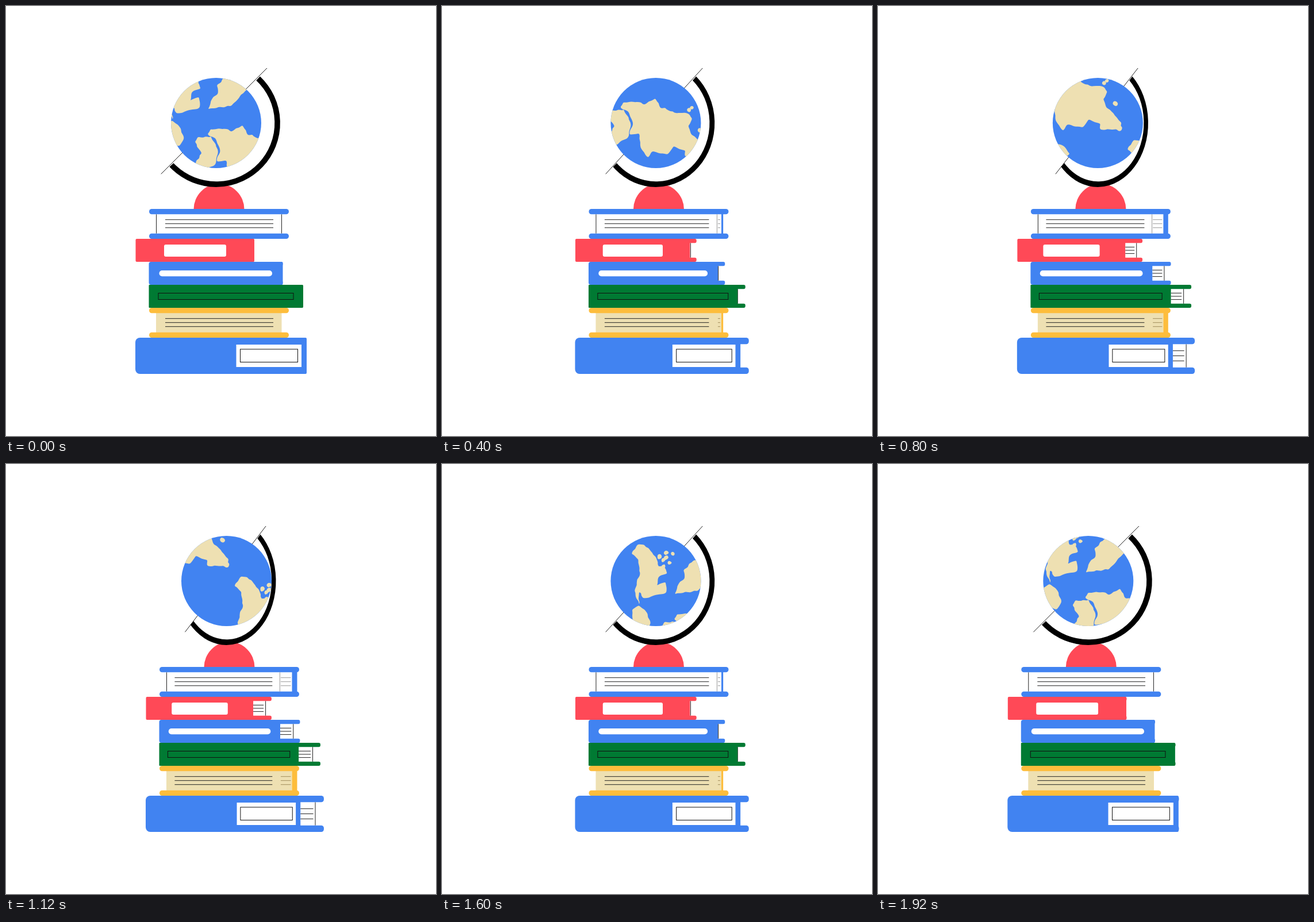
These frames come from a looping animation (748x748 px, 2000 ms). An HTML page with a canvas:

```html
<!DOCTYPE html>
<html lang="en">
<head>
<meta charset="utf-8">
<title>Globe on books</title>
<style>
html, body { margin: 0; width: 100%; height: 100%; overflow: hidden; background: #fff; }
canvas { display: block; width: 748px; height: 748px; }
</style>
</head>
<body>
<canvas id="stage" width="748" height="748"></canvas>
<script>
const ctx = document.getElementById('stage').getContext('2d');
const BLUE = '#4183f1', RED = '#ff4957', GREEN = '#007a33', YELLOW = '#fdbd3c';
const BEIGE = '#eee0b2', INK = '#222', SOFT = '#999';
const LOOP = 2000, STEP = 80, STEPS = LOOP / STEP;
const SHIFT = 18.65;     // sideways travel of every part at full turn
const SQUASH = 0.1;      // share of its width a book front loses at full turn
const DEPTH = 31;        // how far the far cover slides out at full turn
const DRIFT = 9.36;      // map travel per step, left and up
const GLOBE = { x: 365.5, y: 203.5, r: 78.5 };

let seed = 7;
function random() {
  seed = (seed * 16807) % 2147483647;
  return seed / 2147483647;
}

const mid = (a, b) => [(a[0] + b[0]) / 2, (a[1] + b[1]) / 2];

function smooth(pts) {
  const path = new Path2D();
  path.moveTo(...mid(pts[pts.length - 1], pts[0]));
  pts.forEach((pt, i) => path.quadraticCurveTo(...pt, ...mid(pt, pts[(i + 1) % pts.length])));
  path.closePath();
  return path;
}

// Turns a few corners into a ragged shore.
function coast(text) {
  const corners = text.split(' ').map(pair => pair.split(',').map(Number));
  const pts = corners.flatMap(([x, y], i) => {
    const [x2, y2] = corners[(i + 1) % corners.length];
    const parts = Math.max(2, Math.round(Math.hypot(x2 - x, y2 - y) / 5));
    return Array.from({ length: parts }, (_, k) => {
      const rough = k ? 3.5 : 0, t = k / parts;
      return [x + (x2 - x) * t + (random() - .5) * rough, y + (y2 - y) * t + (random() - .5) * rough];
    });
  });
  return smooth(pts);
}

// A loose spiral of islets.
function islands(x, y, count) {
  return Array.from({ length: count }, (_, i) => {
    const cx = x + 6 * Math.sqrt(i) * Math.cos(i * 2.4);
    const cy = y + 6 * Math.sqrt(i) * Math.sin(i * 2.4);
    return smooth(Array.from({ length: 6 }, (_, k) => {
      const r = 2.5 + 3 * random(), a = k * Math.PI / 3;
      return [cx + r * Math.cos(a), cy + r * Math.sin(a)];
    }));
  });
}

// Flat map, measured from the middle of the globe at the start of the loop.
const LANDS = [
  // North America, South America, Greenland
  coast('-89,-94 -78,-111 -67,-110 -47,-89 -42,-72 -33,-72 -27,-60 -42,-54 -45,-39 -30,-45 -29,-26 -55,-20 -69,-17 -76,-28 -76,-6 -84,-30 -74,-61 -77,-84'),
  coast('-88,3 -76,-4 -64,6 -56,27 -64,40 -87,30'),
  coast('-14,-24 -7,-42 3,-51 1,-66 16,-79 30,-87 55,-59 26,-29 4,-28'),
  // Africa, Eurasia, Australia
  coast('-37,33 -32,24 -9,23 3,46 -2,73 -30,88 -39,74 -25,53 -31,44'),
  coast('-15,19 -10,11 15,10 25,15 46,4 53,18 79,29 105,31 110,39 103,52 107,63 135,93 135,107 97,104 98,95 78,87 68,101 39,97 33,107 20,89 18,65 1,67 7,46 -1,27'),
  coast('21,130 35,134 45,147 31,156'),
  ...islands(-29, -87, 7),
  ...islands(109, 20, 2),
  ...islands(124, 60, 1)
];

function box(color, left, top, right, bottom, radius = 0) {
  if (right <= left) return;
  ctx.fillStyle = color;
  ctx.beginPath();
  ctx.roundRect(left, top, right - left, bottom - top, radius);
  ctx.fill();
}

function outline(left, top, right, bottom) {
  ctx.strokeStyle = '#111';
  ctx.lineWidth = 1;
  ctx.strokeRect(left, top, right - left, bottom - top);
}

function line(x1, y1, x2, y2, color = INK) {
  ctx.strokeStyle = color;
  ctx.lineWidth = 1;
  ctx.beginPath();
  ctx.moveTo(x1, y1);
  ctx.lineTo(x2, y2);
  ctx.stroke();
}

// Three text lines around a middle height.
function rows(left, right, y, gap, color) {
  if (right > left) [-gap, 0, gap].forEach(d => line(left, y + d, right, y + d, color));
}

// Where a point of a book front lands after turning.
const turner = (left, p) => x => left + SHIFT * p + (x - left) * (1 - SQUASH * p);

// Book with its page edge to the viewer.
function openBook(p, top, color, pages, soft, ruled) {
  const bottom = top + 52, bar = 9.3, dx = SHIFT * p;
  const front = turner(261, p), edge = front(479.5), inner = 479.5 + dx;
  box(pages, 261 + dx, top + 5, inner, bottom - 5);
  box(color, inner, top + 5, inner + bar * p, bottom - 5);
  if (ruled) {
    line(261.5 + dx, top + bar, 261.5 + dx, bottom - bar);
    line(edge, top + bar, edge, bottom - bar, p > .3 ? SOFT : INK);
  }
  rows(front(277), front(465), top + 25.7, 7, INK);
  rows(edge + 1.5, inner - 2, top + 25.7, 7, soft);
  box(color, 249 + dx, top, 492 + dx, top + bar, 4.5);
  box(color, 249 + dx, bottom - bar, 492 + dx, bottom, 4.5);
}

// Book with its spine to the viewer; pages come out from behind it.
function spineBook(p, left, right, top, height, color, round) {
  const front = turner(left, p), face = front(right), end = right + DEPTH * p;
  const bottom = top + height, bar = height * .18;
  const page = end - (right - left) * .05;
  if (page > face) {
    line(page, top + bar, page, bottom - bar);
    rows(face, page - 3.5, top + height / 2, height * .14, INK);
  }
  box(color, face - 20, top, end, top + bar, bar * .4);
  box(color, face - 20, bottom - bar, end, bottom, bar * .4);
  box(color, front(left), top, face, bottom, [round, 2, 2, round]);
  return front;
}

function drawBooks(p) {
  openBook(p, 353, BLUE, '#fff', SOFT, true);

  let at = spineBook(p, 225.5, 432, 405, 40, RED, 2);
  box('#fff', at(275), 415, at(383), 436, 3);

  at = spineBook(p, 248.5, 481.5, 445, 40, BLUE, 4);
  box('#fff', at(266.5), 460, at(463), 470.3, 5);

  at = spineBook(p, 248.5, 517, 485, 40, GREEN, 1);
  outline(at(265), 499.5, at(500), 510.5);

  openBook(p, 525, YELLOW, BEIGE, '#a08d5c', false);

  at = spineBook(p, 225, 523, 577, 63, BLUE, 8);
  box('#fff', at(400.5), 589, at(514), 628);
  outline(at(407.5), 597, at(507.5), 619.5);
}

function drawStand(p, cx, cy) {
  ctx.fillStyle = RED;
  ctx.beginPath();
  ctx.arc(cx + 5, 353.5, 44, Math.PI, 0);
  ctx.fill();

  line(454 - 2 * p, 108, 269.7 + 43.3 * p, 292.3);

  // The arm narrows as a whole, its weight included.
  ctx.save();
  ctx.translate(cx, cy);
  ctx.scale(1 - .236 * p, 1);
  ctx.rotate(Math.PI / 4);
  ctx.strokeStyle = '#000';
  ctx.lineWidth = 9.6;
  ctx.beginPath();
  ctx.arc(0, 0, 106.6, -Math.PI / 2 - .03, Math.PI / 2 + .03);
  ctx.stroke();
  ctx.restore();
}

function drawGlobe(cx, cy, step) {
  ctx.save();
  ctx.beginPath();
  ctx.arc(cx, cy, GLOBE.r, 0, 2 * Math.PI);
  ctx.fillStyle = BLUE;
  ctx.fill();
  ctx.clip();
  ctx.translate(cx, cy);
  ctx.fillStyle = BEIGE;
  for (const lap of [-1, 0, 1]) {
    const d = (lap * STEPS - step) * DRIFT;
    ctx.save();
    ctx.translate(d, d);
    LANDS.forEach(land => ctx.fill(land));
    ctx.restore();
  }
  ctx.restore();
}

function draw() {
  const step = Math.floor(performance.now() % LOOP / STEP);
  const p = (1 - Math.cos(2 * Math.PI * step / STEPS)) / 2;
  const cx = GLOBE.x + SHIFT * p;
  ctx.fillStyle = '#fff';
  ctx.fillRect(0, 0, 748, 748);
  drawStand(p, cx, GLOBE.y);
  drawGlobe(cx, GLOBE.y, step);
  drawBooks(p);
  requestAnimationFrame(draw);
}
draw();
</script>
</body>
</html>
```
